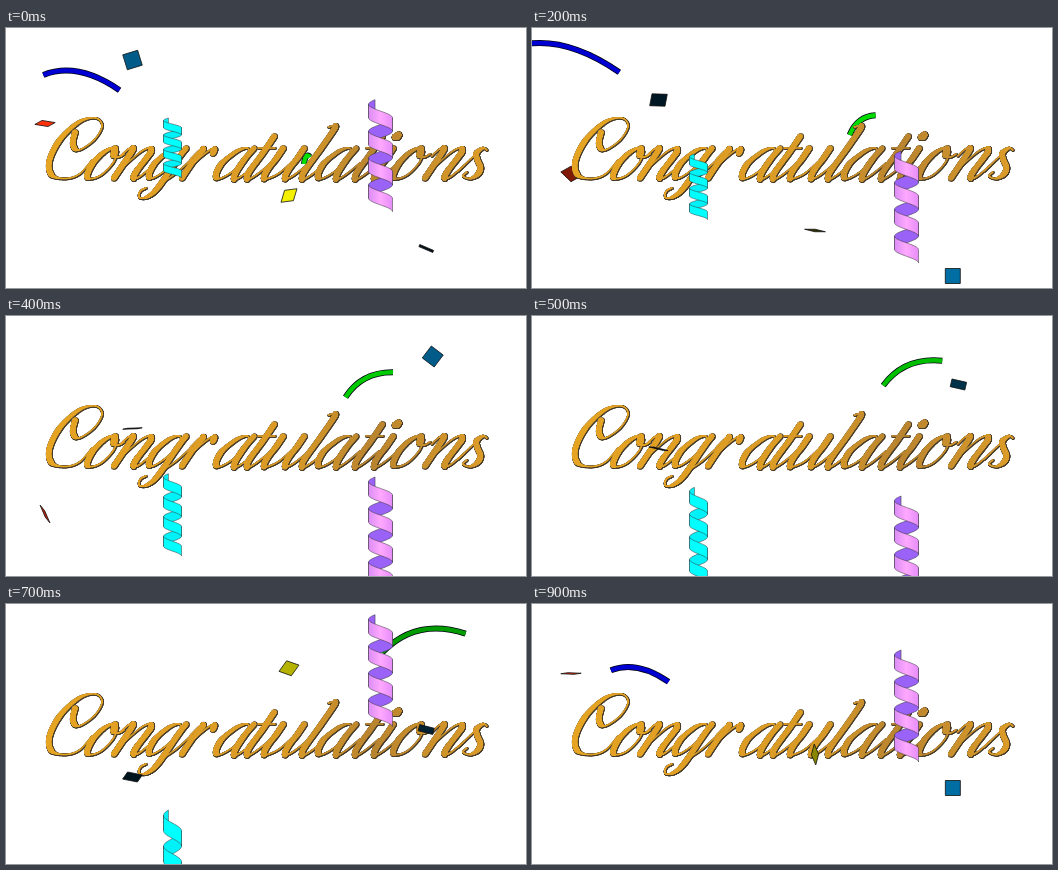
Write an HTML page with a canvas that moves like this. It is 520 px wide and 260 px high and loops after 1 s.

```html
<!DOCTYPE html>
<html lang="en">
<head>
<meta charset="utf-8">
<title>Congratulations</title>
<style>
html, body { margin: 0; height: 100%; overflow: hidden; background: #fff }
canvas { display: block }
</style>
</head>
<body>
<canvas id="stage" width="520" height="260" role="img" aria-label="Congratulations"></canvas>
<script>
const stage = document.getElementById('stage');
const ctx = stage.getContext('2d');

// ---- Lettering: pen strokes as "x,height" points on a slanted baseline ----
const BASE = 151, SLANT = 0.68;
const tail = ' -1,8 1,1 4,0 9,5 15,16';
const glyphs = {
  C: ['37,47 43,35 53,29 61.5,39 60,53 48,61 34,57 27,39 31,18 43,4 59,0.5 70,5 73,19'],
  o: ['3,30 -1,31 -7,26 -10,15 -7,3 0,0.5 7,5 10,16 7,27 2,31', '2,31 5,24 11,22 15,25'],
  n: ['0,23 3,30 7.5,30 8,14 8,1',
      '8,2 10,12 17,27 23,31 27,28 27,20 26,8 27,2 30,0.5 34,4 39,14'],
  g: ['-1,27 -6,31 -14,28 -20,16 -18,4 -12,1 -5,8 0,20',
      '1,31 0,20 0,0 -1,-12 -5,-18 -11,-19 -15,-15 -15,-11 -12,-9', '0,-4 8,6 14,20'],
  r: ['-4,20 -1,29 2,29 0,14 0,1', '0,4 3,18 9,29 13,30 14,26'],
  a: ['-1,27 -6,31 -14,28 -21,16 -19,4 -13,0.5 -5,7 0,20', '1,31 -1,20' + tail],
  t: ['0,43 0,25' + tail, '-8,31 9,31'],
  u: ['0,31 0,20 -1,8 1,1 5,0.5 13,6 19,20 21,31', '21,31 21,20 20,8 22,1 25,0.5 30,5 36,16'],
  l: ['-7,52 -3,53 0,51 0,30' + tail],
  i: ['0,31 0,20' + tail, '-5,45 -6,42 -2,41 -1,44 -4,45 -3,42'],
  s: ['-2.4,8 2,20 6.4,31', '12,29 7,31 3.7,26 9.5,19 18,11 19,4 14,0.5 6,3 7,7']
};
const starts = [0, 86, 99, 158, 175, 226, 239, 256, 294, 328, 347, 366, 392, 410, 449];

function spline(a, b, c, d, t) {
  return 0.5 * (2 * b + (c - a) * t + (2 * a - 5 * b + 4 * c - d) * t * t +
    (3 * b - a - 3 * c + d) * t * t * t);
}

// Down strokes press wide, up strokes stay thin.
function penDots() {
  const dots = [];
  [...'Congratulations'].forEach((ch, n) => glyphs[ch].forEach(stroke => {
    const pts = stroke.split(' ').map(p => {
      const [u, v] = p.split(',').map(Number);
      return [starts[n] + u + SLANT * v, BASE - v];
    });
    const pt = i => pts[Math.max(0, Math.min(pts.length - 1, i))];
    const pos = (i, t) => [0, 1].map(k => spline(pt(i - 1)[k], pt(i)[k], pt(i + 1)[k], pt(i + 2)[k], t));
    for (let i = 0; i < pts.length - 1; i++)
      for (let t = 0; t < 1; t += 0.03) {
        const [x, y] = pos(i, t), [x2, y2] = pos(i, t + 0.01);
        const down = Math.max(0, (y2 - y) / (Math.hypot(x2 - x, y2 - y) || 1));
        dots.push([x, y, 0.7 + 1.9 * Math.min(1, down / 0.83) ** 1.4]);
      }
  }));
  return dots;
}

function makeTitle() {
  const layer = document.createElement('canvas');
  layer.width = 520;
  layer.height = 260;
  const g = layer.getContext('2d'), dots = penDots();
  const stamp = (grow, shift, color) => {
    g.fillStyle = color;
    for (const [x, y, r] of dots) {
      g.beginPath();
      g.arc(x + shift, y + shift, r + grow, 0, 7);
      g.fill();
    }
  };
  const gold = g.createLinearGradient(39, 0, 481, 0);
  [[0, '#e6a422'], [0.55, '#d99a26'], [0.74, '#b9842f'], [1, '#dc9c28']]
    .forEach(s => gold.addColorStop(...s));
  stamp(0.7, 0.5, '#4a3f2c');
  stamp(0, 0, gold);
  return layer;
}
const title = makeTitle();

// ---- Motion: keys by step; steps past 9 continue into the next loop ----
function at(keys, step) {
  const ks = Object.keys(keys).map(Number);
  const k = step < ks[0] ? step + 10 : step;
  const i = ks.findIndex(v => v >= k);
  if (i < 0) return null;
  if (ks[i] === k) return keys[k];
  const from = keys[ks[i - 1]], p = (k - ks[i - 1]) / (ks[i] - ks[i - 1]);
  return from.map((v, j) => v + (keys[ks[i]][j] - v) * p);
}

// Tumbling paper; each key holds y, flatness, lean, brightness
const papers = {
  red: { x: 39, size: 7.5, turn: 0.5, color: [255, 50, 12], keys: {
    8: [33, 0.65, -0.6, 1], 9: [69.5, 0.08, 0, 0.9], 10: [95.5, 0.3, 0, 1],
    12: [146, 0.7, 0.4, 0.5], 14: [198, 0.12, 1.1, 0.7] } },
  navy: { x: 126.5, size: 7.8, turn: 0.3, color: [0, 160, 240], keys: {
    0: [32, 1, -0.6, 0.57], 2: [72, 0.75, -0.2, 0.15], 4: [112.5, 0.05, -0.05, 0.05],
    6: [153, 0.08, 0.49, 0.1], 8: [193, 0.9, -0.4, 0.15] } },
  blue: { x: 423, size: 7.5, turn: 0, color: [0, 160, 240], keys: {
    3: [13.5, 0.9, 0, 0.81], 4: [40.5, 1, 0.65, 0.57], 6: [96.5, 0.05, -0.2, 0.05],
    8: [154.5, 0.8, 0.7, 0.36], 9: [184, 1, 0, 0.68], 10: [220.5, 0.15, 0.4, 0.1],
    12: [248, 1, 0, 0.68] } },
  yellow: { x: 283, size: 7.4, turn: 0.78, color: [245, 240, 0], keys: {
    6: [21.5, 1, 0, 0.48], 8: [107, 0.5, -0.6, 1], 9: [150.5, 0.35, 1.5, 0.56],
    10: [167.5, 0.65, -0.7, 1], 12: [202.5, 0.12, 0.12, 0.2], 13: [220, 0.7, 0, 0.3] } }
};

function paper({ x, size, turn, color, keys }, step) {
  const pose = at(keys, step);
  if (!pose) return;
  const [y, flat, lean, light] = pose;
  ctx.save();
  ctx.translate(x + (x > 400 ? 4 * Math.sin(step * 0.9 + 3.9) : 0), y);
  ctx.rotate(lean);
  ctx.scale(1, flat);
  ctx.rotate(turn);
  ctx.beginPath();
  ctx.rect(-size, -size, 2 * size, 2 * size);
  ctx.restore();
  ctx.fillStyle = `rgb(${color.map(c => c * light)})`;
  ctx.fill();
  ctx.strokeStyle = '#111';
  ctx.lineWidth = 0.8;
  ctx.stroke();
}

function arc(x, y, cx, cy, dx, dy, color) {
  for (const [width, ink] of [[6, '#001'], [4.4, color]]) {
    ctx.beginPath();
    ctx.moveTo(x, y);
    ctx.quadraticCurveTo(x + cx, y + cy, x + dx, y + dy);
    ctx.lineWidth = width;
    ctx.strokeStyle = ink;
    ctx.stroke();
  }
}

// Both ribbons grow as they fly towards the viewer.
function blueArc(step) {
  const p = (step + 2) % 10;
  if (p > 5) return;
  const ease = 1 - (1 - p / 5) ** 2, w = 39 + 18.6 * p;
  arc(166 - 82 * ease, 98 - 56 * ease, -0.55 * w, -0.38 * w, -w, -0.2 * w, '#0000d2');
}

function greenArc(k) {
  if (k > 8) return;
  const w = 6 + 9.5 * k + 0.22 * k * k;
  arc(298 + 9.3 * k + 0.27 * k * k, 136 - 15.3 * k + 0.4 * k * k,
    (0.25 + 0.022 * k) * w, -12 - 3.3 * k,
    w, -7 - 8.2 * k + 0.93 * k * k, `rgb(0,${225 - 1.4 * k * k},0)`);
}

const purpleTop = { 6: [-7], 9: [46], 12: [123], 15: [180] };
const cyanTop = { 0: [90], 3: [144], 6: [185], 8: [227] };

function spiral(cx, r, top, length, front, back) {
  const first = -1.1, last = 7 * Math.PI, h = length * 0.12;
  const rise = (length - h) / (last - first);
  const edge = a => [cx - r * Math.cos(a), top + (a - first) * rise];
  const band = (from, to, fill) => {
    const pts = Array.from({ length: 17 }, (_, i) => edge(from + (to - from) * i / 16));
    ctx.beginPath();
    pts.forEach(([x, y]) => ctx.lineTo(x, y));
    pts.reverse().forEach(([x, y]) => ctx.lineTo(x, y + h));
    ctx.closePath();
    ctx.fillStyle = fill;
    ctx.fill();
    ctx.strokeStyle = '#333';
    ctx.lineWidth = 0.5;
    ctx.stroke();
  };
  for (let i = -1; i < 7; i += 2) band(Math.max(first, i * Math.PI), (i + 1) * Math.PI, back);
  for (let i = 0; i < 7; i += 2) band(i * Math.PI, (i + 1) * Math.PI, front);
}

const pink = ctx.createLinearGradient(362, 0, 387, 0);
['#d98cf4', '#ffa8ff', '#e48cf8'].forEach((c, i) => pink.addColorStop(i / 2, c));

function draw(step) {
  ctx.fillStyle = '#fff';
  ctx.fillRect(0, 0, 520, 260);

  paper(papers.red, step);
  greenArc(step);
  ctx.drawImage(title, 0, 0);
  blueArc(step);
  for (const name of ['navy', 'blue', 'yellow']) paper(papers[name], step);

  const purple = at(purpleTop, step);
  if (purple) spiral(374.5, 12, purple[0], 112, pink, '#9a62f6');
  const cyan = at(cyanTop, step);
  if (cyan) spiral(166.5, 9, cyan[0], 60 + 1.4 * step * step, '#00ffff', '#00f2f8');
}

function tick(now) {
  draw(Math.floor(now / 100) % 10);
  requestAnimationFrame(tick);
}
tick(0);
</script>
</body>
</html>
```
